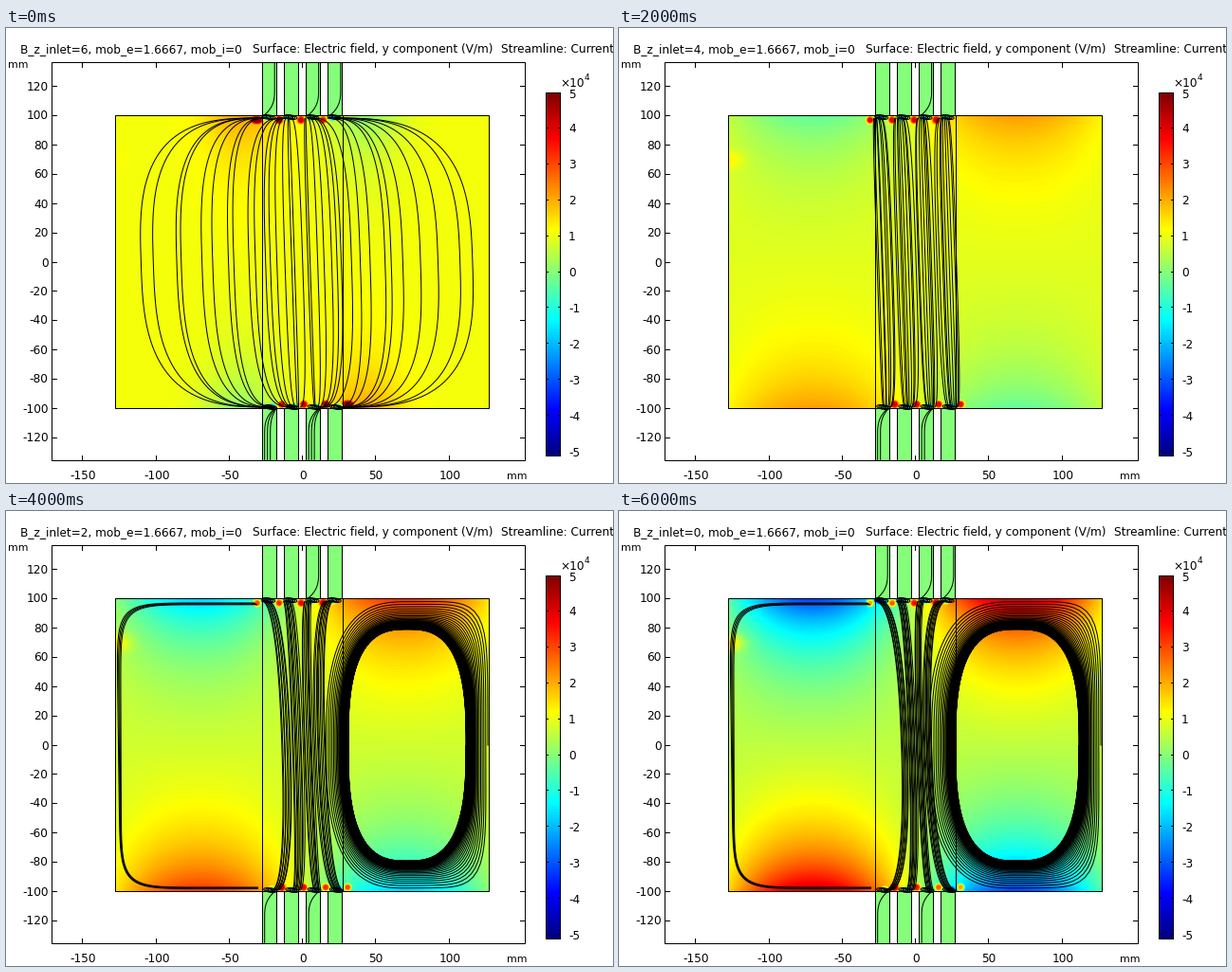
A matplotlib script for the animation above (7000 ms loop, 640 by 480 pixels).

```python
import numpy as np
import matplotlib.pyplot as plt
from matplotlib.animation import FuncAnimation
from matplotlib.collections import LineCollection
from matplotlib.colors import ListedColormap
from matplotlib.patches import Rectangle

W, H, DPI = 640, 480, 100
PX = 72 / DPI                       # one pixel in points
X0, Y0, SCALE = 312.5, 247, 1.545   # plot origin and pixels per mm
LEFT, RIGHT, TOP, BOTTOM = 115, 510, 92, 402
V_MIN, V_MAX = -5.13, 5.0
FRAMES = 7
LINES = 34
PORTS = X0 + 23.2 * (np.arange(4) - 1.5)   # channel centres
PORT_W = 15

plt.rcParams["font.family"] = "DejaVu Sans"
plt.rcParams["path.snap"] = False   # half-pixel coordinates give crisp lines

level = np.linspace(0, 1, 256)
JET = ListedColormap(np.column_stack(
    [np.clip(1.5 - np.abs(4 * level - c), 0, 1) for c in (3, 2, 1)]))


def lerp(a, b, t):
    return a + (b - a) * t


def edge_decay(y, depth):
    """Odd profile that is 1 at the top wall and -1 at the bottom wall."""
    return np.sinh(y / depth) / np.sinh(100 / depth)


def field(k):
    """Electric field over the chamber, one value per pixel."""
    px, py = np.meshgrid(np.arange(LEFT, RIGHT) + 0.5,
                         np.arange(TOP, BOTTOM) + 0.5)
    x, y = (px - X0) / SCALE, (Y0 - py) / SCALE
    v = 1.1 - 0.09 * k + 0.63 * k * np.sin(np.pi * x / 140) * edge_decay(y, 38)

    near = max(0, 1 - k / 2)
    v -= near * np.sign(x) * np.exp(-((np.abs(x) - 42) / 26) ** 2) \
        * edge_decay(y, 30)
    v += (0.1 + 0.22 * k) * np.exp(-((x + 127) / 10) ** 2 - ((y - 70) / 6) ** 2)

    # Hot and cold corners beside each inlet, mirrored through the centre
    for i, port in enumerate(PORTS):
        size = 6 if i == 0 and k < 2 else 4
        for dx, dy, amp in ((-13, 5, 3.8 - 0.3 * i), (-3, 2, -2.6)):
            for side in (1, -1):
                r2 = ((px - X0 - side * (port + dx - X0)) / size) ** 2 \
                    + ((py - Y0 + side * (Y0 - TOP - dy)) / 4) ** 2
                v += amp * np.exp(-r2 ** 2)
    return v


def bowed(top, mid, bot, n, y0=95, y1=400):
    """Line from the top wall to the bottom wall, bowed through mid."""
    s = (1 - np.cos(np.linspace(0, np.pi, 120))) / 2
    bow = (1 - np.abs(2 * s - 1) ** n) ** (1 / n)
    x = lerp(top, bot, s) + (mid - (top + bot) / 2) * bow
    return np.column_stack([x, lerp(y0, y1, s)])


def port_lines(k):
    """Lines between facing inlets; they contract as the inlet field falls."""
    rng = np.random.default_rng(4)
    spread = 12 + 50 * np.exp((1 - k) / 2)
    flare = 84 * max(0, 1 - k)
    n = 2.4 + 1.6 * np.exp(-(k - 1) ** 2)
    step = 2 / (LINES - 1)
    lines = []
    for u in np.linspace(-1, 1, LINES) + step * rng.uniform(-0.4, 0.4, LINES):
        u = np.clip(u, -1, 1)
        slot = (u + 1) * 1.999
        i = int(slot)
        x = PORTS[i] + 8 * (slot - i - 0.5)
        mid = X0 + 1 + spread * u + flare * u ** 3
        lines.append(bowed(x - 5, mid, x + 5, n))
    return lines


def wall_loop(k):
    """Lines that hug the walls of the left half."""
    return [bowed(262 + j, 118.5 + 0.9 * j, 266, 9, 97 + 0.6 * j, 398.5 - 0.5 * j)
            for j in range(2 if k == 3 else 4)]


def vortex(d):
    """Spiral that fills the right half, dense inside and looser outside."""
    turns = 32
    u = np.linspace(0, 1, turns * 120)
    q = (np.exp(3 * u) - 1) / (np.exp(3) - 1)
    c, s = np.cos(2 * np.pi * turns * u), np.sin(2 * np.pi * turns * u)
    left, right = lerp(364 - 3 * d, 342 - 5.5 * d, q), lerp(485, 508, q)
    top, bot = lerp(125, 95, q), lerp(369, 400, q)
    n = np.where(c > 0, lerp(2.8, 6, q), 2.8)
    r = (np.abs(c) ** n + np.abs(s) ** n) ** (-1 / n)
    return np.column_stack([(left + right) / 2 + r * c * (right - left) / 2,
                            (top + bot) / 2 + r * s * (bot - top) / 2])


def feed(x, y0, y1, shift):
    """Line along a channel that bends aside at the mouth."""
    s = np.linspace(0, 1, 40)
    bend = np.clip((s - 0.5) / 0.5, 0, 1) ** 3
    return np.column_stack([x + shift * bend, lerp(y0, y1, s)])


def feeds(k):
    top = [2] if abs(k - 3) < 2 else [0, 2, 3]
    lines = [feed(PORTS[i] + 5.5, 37, TOP, -11) for i in top]
    for i in (0, 2):
        for j in range(max(1, 3 - k // 2)):
            lines.append(feed(PORTS[i] - 5 + 3 * j, 456, BOTTOM, 10 - 2 * j))
    return lines


def knots():
    """Small swirls at the channel mouths."""
    t = np.linspace(0, 2 * np.pi, 30)
    return [np.column_stack([x + 7 * r * np.cos(t), y + 2.5 * r * np.sin(t + 0.4)])
            for port in PORTS
            for x, y in ((port - 1, TOP + 2), (port + 1, BOTTOM - 2))
            for r in (0.4, 0.7, 1)]


def streamlines(k):
    lines = feeds(k) + knots() + port_lines(k)
    if k >= 3:
        lines += wall_loop(k) + [vortex(k - 3)]
    return lines


fig = plt.figure(figsize=(W / DPI, H / DPI), dpi=DPI, facecolor="white")
ax = fig.add_axes([0, 0, 1, 1])


def text(x, y, s, size=12.1, ha="left"):
    return ax.text(x, y, s, fontsize=size * PX, ha=ha, va="baseline")


def line(xs, ys):
    ax.plot(xs, ys, color="black", lw=PX, zorder=5)


def box(x, y, w, h):
    ax.add_patch(Rectangle((x, y), w, h, fc="none", ec="black", lw=PX, zorder=5))


surface = ax.imshow(field(0), cmap=JET, vmin=V_MIN, vmax=V_MAX, aspect="auto",
                    extent=(LEFT, RIGHT, BOTTOM, TOP), interpolation="nearest",
                    zorder=2)
ax.imshow(np.linspace(V_MAX, V_MIN, 384)[:, None], cmap=JET, vmin=V_MIN,
          vmax=V_MAX, aspect="auto", extent=(569, 585, 452, 68), zorder=2)

# Inlet channels
green = JET((0 - V_MIN) / (V_MAX - V_MIN))
for port in PORTS:
    x = np.floor(port - PORT_W / 2) + 0.5
    for y0, y1 in ((36.5, 92.5), (401.5, 456.5)):
        ax.add_patch(Rectangle((x, y0), PORT_W, y1 - y0, fc=green, ec="none",
                               zorder=1))
        line((x, x), (y0, y1))
        line((x + PORT_W, x + PORT_W), (y0, y1))
for x in (270.5, 355.5):
    line((x, x), (92.5, 401.5))
box(115.5, 92.5, 394, 309)

# Plot frame with ticks
box(48.5, 36.5, 499, 420)
for mm in range(-120, 121, 20):
    y = np.floor(Y0 - mm * SCALE) + 0.5
    line((48.5, 53.5), (y, y))
    line((542.5, 547.5), (y, y))
    text(44.5, y + 4, str(mm), ha="right")
for mm in range(-150, 101, 50):
    x = np.floor(X0 + mm * SCALE) + 0.5
    line((x, x), (451.5, 456.5))
    line((x, x), (36.5, 41.5))
    text(x + 0.5, 476, str(mm), ha="center")
text(2, 42, "mm", 11)
text(528, 476, "mm", 11)

# Colour bar
box(569.5, 68.5, 15, 383)
for value in range(-5, 6):
    y = np.floor(68 + (V_MAX - value) * 37.8) + 0.5
    line((569.5, 571.5), (y, y))
    line((582.5, 584.5), (y, y))
    text(593, y + 5, str(value))
text(584, 62, "×10")
text(610, 55, "4", 9)

title = text(15, 26, "")
text(260, 26, "Surface: Electric field, y component (V/m)")
text(522, 26, "Streamline: Current")

flow = LineCollection([], colors="black", linewidths=PX, zorder=4)
ax.add_collection(flow)

ax.set_xlim(0, W)
ax.set_ylim(H, 0)
ax.axis("off")


def draw(k):
    surface.set_data(field(k))
    flow.set_segments(streamlines(k))
    title.set_text(f"B_z_inlet={6 - k}, mob_e=1.6667, mob_i=0")
    return surface, flow, title


anim = FuncAnimation(fig, draw, frames=FRAMES, interval=1000, repeat=True,
                     repeat_delay=0, blit=False)
plt.show()
```
